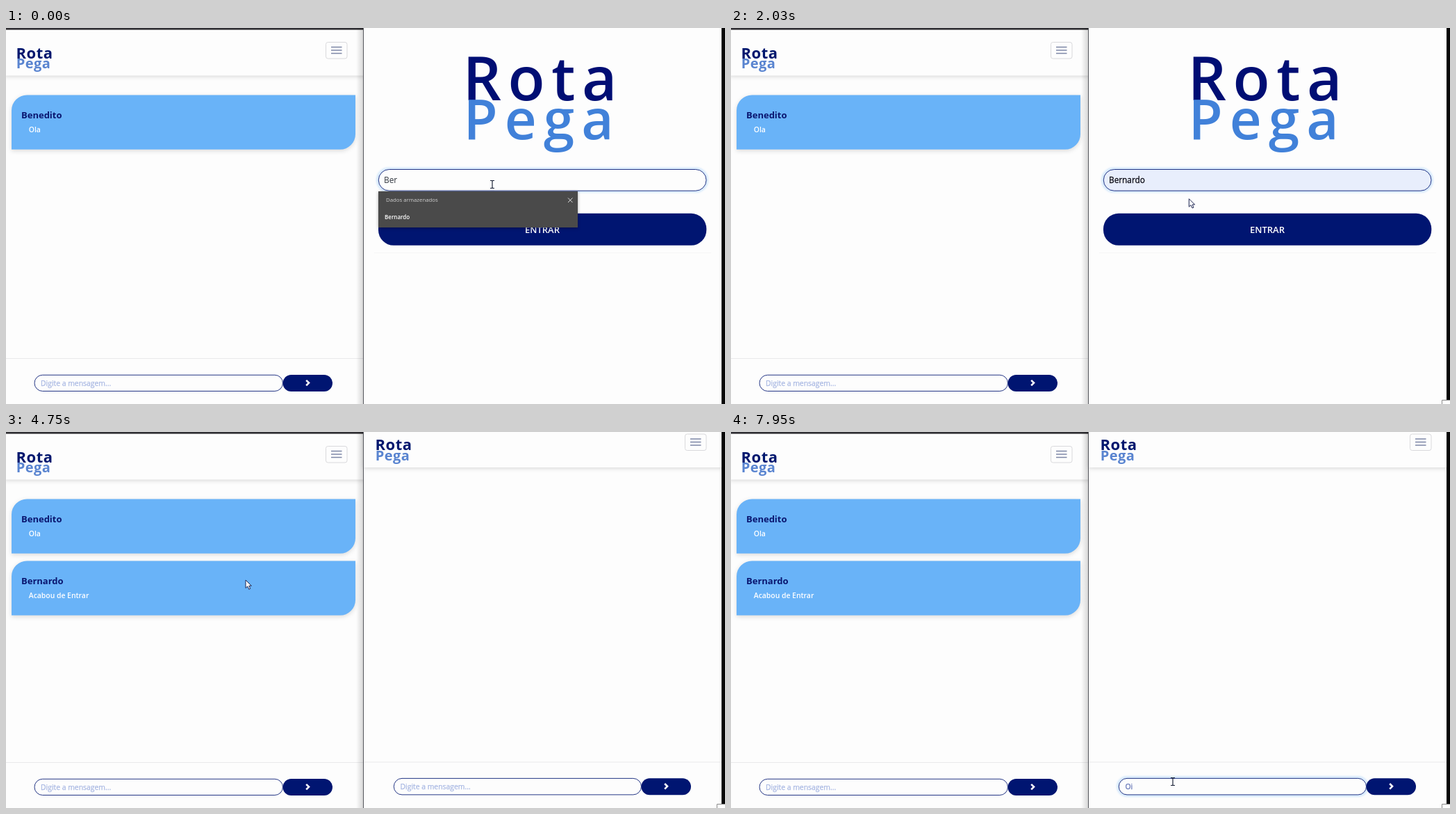
An HTML page for the animation above (8 s loop, 1035 px wide and 541 px high).

```html
<!DOCTYPE html>
<html lang="pt">
<head>
<meta charset="utf-8">
<title>Chat</title>
<style>
  html, body { margin: 0; width: 100%; height: 100%; overflow: hidden; background: #fdfdfd; }
  svg { display: block; width: 1035px; height: 541px; }
  text { font-family: "Open Sans", "Noto Sans", sans-serif; white-space: pre; }
  .navy { fill: #001571; }
  .logo { font-weight: 600; }
  .small { font-weight: 700; letter-spacing: .5px; }
  .name { font-size: 13px; font-weight: 700; fill: #0a1670; }
  .msg { font-size: 10.4px; font-weight: 600; fill: #fff; }
  .hint { font-size: 10.4px; fill: #a6b6e2; stroke: #a6b6e2; stroke-width: .25; }
  .field { fill: #fdfdfd; stroke: #0c2078; stroke-width: .9; }
  .enter { font-size: 13px; font-weight: 600; fill: #fff; text-anchor: middle; }
  .card { fill: #69b3f8; filter: drop-shadow(0 2px 3px rgba(0, 0, 0, .14)); }
  .bar { fill: #fdfdfd; filter: drop-shadow(0 1px 3px rgba(0, 0, 0, .17)); }
  .glow { fill: none; stroke: #86c0fa; stroke-width: 4; opacity: .32; filter: blur(1px); }
</style>
</head>
<body>
<svg viewBox="0 0 1035 541">
  <defs>
    <linearGradient id="edge">
      <stop offset="0" stop-color="#000" stop-opacity="0"/>
      <stop offset="1" stop-color="#000" stop-opacity=".15"/>
    </linearGradient>
    <g id="header">
      <rect class="bar" x="-2" y="-20" width="520" height="88.5"/>
      <text class="small" x="14.500" y="43.500" font-size="22" fill="#00176e">Rota</text>
      <text class="small" x="14.700" y="58" font-size="20" fill="#5984d0">Pega</text>
      <rect x="460.500" y="20.500" width="30.500" height="23.500" rx="3" fill="#fdfdfd" stroke="#d9d9dc"/>
      <path d="M468 27.500h15.500M468 32h15.500M468 36.500h15.500" stroke="#7d86a6" stroke-width="1.300"/>
    </g>
    <g id="send">
      <rect class="navy" x="398.500" y="499" width="71.500" height="24" rx="12"/>
      <path d="M432.200 506.800l3.800 3.800-3.800 3.800" fill="none" stroke="#fff" stroke-width="2.600"/>
    </g>
    <path id="card" class="card" d="M8 174.800V118.500A22 22 0 0 1 30 96.500H503V152.800A22 22 0 0 1 481 174.800Z"/>
  </defs>

  <rect width="1035" height="541" fill="#fdfdfd"/>
  <use href="#header"/>
  <rect width="514" height="2.600" fill="#302f33"/>
  <use href="#card"/>
  <text class="name" x="22" y="129.500">Benedito</text>
  <text class="msg" x="32.800" y="150">Ola</text>
  <g id="joined">
    <use href="#card" y="89"/>
    <text class="name" x="22" y="218.500">Bernardo</text>
    <text class="msg" x="32.800" y="239">Acabou de Entrar</text>
  </g>
  <path d="M0 475.500H514" stroke="#e9e9eb"/>
  <rect class="field" x="41" y="499.300" width="357.500" height="23.200" rx="11.600"/>
  <text class="hint" x="50" y="514.500">Digite a mensagem...</text>
  <use href="#send"/>

  <rect x="504" width="10" height="541" fill="url(#edge)"/>
  <rect x="514" width="521" height="541" fill="#fdfdfd"/>

  <g id="login">
    <text class="logo" x="657.500" y="104" font-size="87" letter-spacing="9.500" fill="#000e74">Rota</text>
    <text class="logo" x="658.500" y="160" font-size="80" letter-spacing="10" fill="#4181d9">Pega</text>
    <rect id="userGlow" class="glow" x="535" y="202.500" width="474" height="32.500" rx="16"/>
    <rect id="user" class="field" x="536.300" y="203.500" width="471.700" height="30.700" rx="15.300"/>
    <text id="typed" x="544" y="223" font-size="11.800"></text>
    <path id="caret" d="M0 211v15" stroke="#000"/>
    <g id="idle">
      <rect class="navy" x="536" y="266.800" width="472.300" height="46" rx="22"/>
      <text class="enter" x="772" y="294.500">ENTRAR</text>
      <path d="M530 323.500H1015" stroke="#f5f5f6"/>
    </g>
    <g id="hover">
      <rect x="536.700" y="267.500" width="470.800" height="47.500" rx="22" fill="#fdfdfd" stroke="#0a1e76" stroke-width="1.500"/>
      <text class="enter" x="772" y="296" style="fill:#0a1e76">ENTRAR</text>
      <path d="M530 326.500H1015" stroke="#f5f5f6"/>
    </g>
    <g id="menu">
      <rect x="536" y="235" width="287" height="52" fill="#4a4a4a" style="filter:drop-shadow(0 1px 2px rgba(0,0,0,.35))"/>
      <rect id="pick" x="536" y="259" width="287" height="26" fill="#5a5a5a"/>
      <text x="547" y="250" font-size="7.800" fill="#d2d2d2">Dados armazenados</text>
      <text x="545" y="275" font-size="8" font-weight="600" fill="#fff">Bernardo</text>
      <path d="M809 244.500l6.500 6.500m0-6.500l-6.500 6.500" stroke="#ddd"/>
    </g>
  </g>

  <g id="chat">
    <use href="#header" x="517" y="-17.500"/>
    <path d="M515 475H1030" stroke="#e9e9eb"/>
    <rect id="msgGlow" class="glow" x="557" y="497" width="359" height="26" rx="13"/>
    <rect class="field" x="558.300" y="498.400" width="356.200" height="23.500" rx="11.700"/>
    <text id="draft" class="hint" x="567.500" y="514"></text>
    <use href="#send" x="516" y="-.8"/>
  </g>

  <path d="M514.500 0V541" stroke="#55565c"/>
  <rect x="1030" width="5" height="541" fill="#050505"/>
  <path id="corner" d="M1023.500 542V535.500H1036V542Z" fill="#fff" stroke="#8a8a8a"/>

  <g id="cursor" stroke-linejoin="round">
    <path id="beam" d="M-3 -5.500h2q1 0 1 1v9q0 1-1 1h-2M3 -5.500h-2q-1 0-1 1m0 9q0 1 1 1h2" fill="none" stroke="#1c2438" stroke-width="1.200"/>
    <path id="arrow" d="M0 0V11.500L2.700 9 4.700 13.300 6.700 12.400 4.800 8.300H8.300Z" fill="#fff" stroke="#1b2350"/>
    <path id="hand" d="M-1.300 1.500Q0-.8 1.300 1.500V6L7 7.500Q8.300 8 8 10L7 16H.3L-3.500 11Q-4.600 9-2.900 8.700L-1.300 9.800Z" fill="#fff" stroke="#1b2350" stroke-width="1.200"/>
  </g>
</svg>
<script>
const LOOP = 8000;
const el = id => document.getElementById(id);
const show = (id, on) => { el(id).style.display = on ? "" : "none"; };

// time, x, y of the pointer
const path = [
  [0, 700, 225], [150, 700, 225], [600, 655, 270], [1050, 652, 270],
  [1450, 657, 245], [2300, 660, 246], [2960, 675, 267], [3200, 670.5, 278],
  [3800, 670.5, 278], [4600, 345, 213], [4900, 345, 213],
  [5540, 597, 478], [6000, 636, 503], [LOOP, 636, 503]
];

function pointerAt(t) {
  const i = path.findIndex(p => p[0] > t);
  const [t0, x0, y0] = path[i - 1], [t1, x1, y1] = path[i];
  const k = (t - t0) / (t1 - t0), e = k * k * (3 - 2 * k);
  return [x0 + (x1 - x0) * e, y0 + (y1 - y0) * e];
}

function render(t) {
  const filled = t >= 550, picked = t >= 1050;
  const over = t >= 3050, inChat = t >= 3540, focused = t >= 6200;

  show("joined", t >= 3410);
  show("login", !inChat);
  show("chat", inChat);
  show("corner", t >= 420);

  const typed = el("typed"), ink = filled ? "#0b0b14" : "#3f444c";
  typed.textContent = filled ? "Bernardo" : "Ber";
  typed.style.fill = typed.style.stroke = ink;
  typed.style.strokeWidth = filled ? .3 : .1;
  el("user").style.fill = filled ? "#e8eefc" : "";
  show("userGlow", t < 3380);
  show("menu", !picked);
  show("pick", filled);
  show("idle", !over);
  show("hover", over);

  const blink = picked && t < 3380 && (t - 1050) % 1000 < 500;
  show("caret", blink);
  if (blink) {
    const end = 544.5 + typed.getComputedTextLength();
    el("caret").setAttribute("transform", `translate(${end})`);
  }

  const draft = t < 7450 ? "" : t < 7700 ? "O" : "Oi";
  el("draft").textContent = draft || "Digite a mensagem...";
  el("draft").style.fill = el("draft").style.stroke = draft ? "#5f71b4" : "";
  show("msgGlow", focused);

  const [x, y] = pointerAt(t);
  const beam = t < 220 || (inChat && x > 558 && y > 498);
  const hand = over && t < 3800;
  el("cursor").setAttribute("transform", `translate(${x} ${y})`);
  show("beam", beam);
  show("hand", hand);
  show("arrow", !beam && !hand);
}

const start = performance.now();
function tick() {
  render((performance.now() - start) % LOOP);
  requestAnimationFrame(tick);
}
tick();
</script>
</body>
</html>
```
